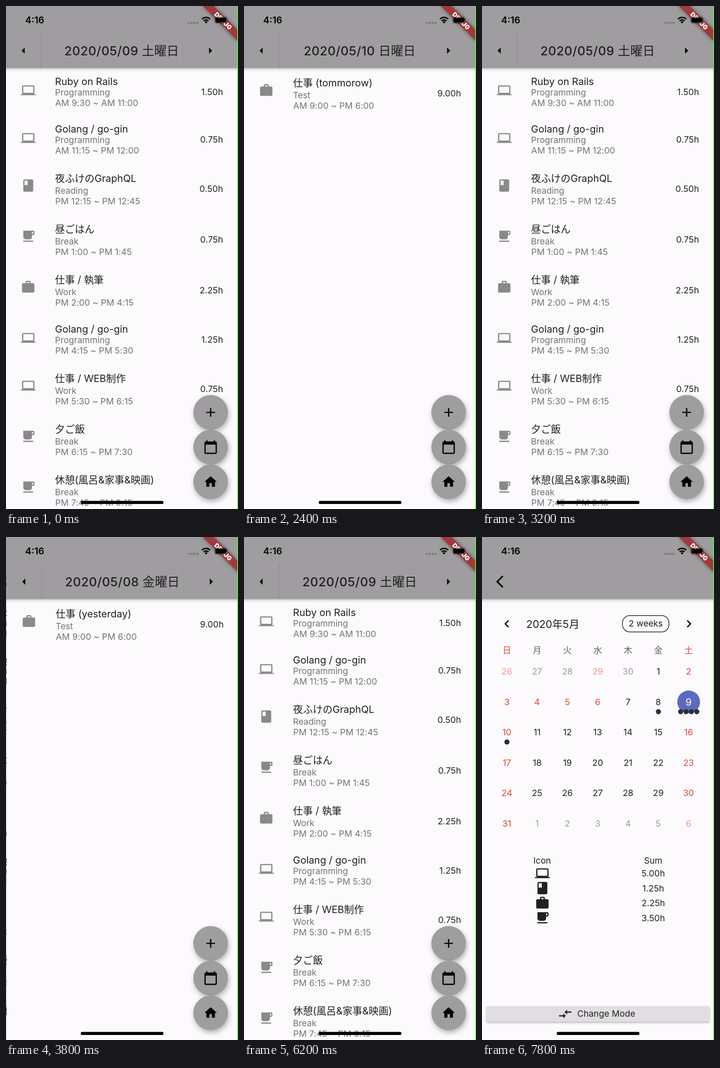
An HTML page that plays this animation: 509 by 1101 pixels, repeating every 8000 ms.

```html
<!DOCTYPE html>
<html lang="ja">
<head>
<meta charset="utf-8">
<title>Time log</title>
<style>
  html, body { margin: 0; width: 100%; height: 100%; overflow: hidden; background: #fcfafc; }
  svg { display: block; width: 100vw; height: 100vh; }
  text { font-family: Inter, "Noto Sans CJK JP", "Noto Sans CJK", sans-serif; font-size: 19px; fill: #222022; white-space: pre; }
  .cjk { font-weight: 300; letter-spacing: 0; }
  .mid { text-anchor: middle; }
  .end { text-anchor: end; }
  .num { letter-spacing: .1px; }
  .date { font-size: 27.1px; font-weight: 500; letter-spacing: .55px; }
  .title { font-size: 21.7px; }
  .sub { fill: #757375; }
  .month { font-size: 23px; }
  .red { fill: #e0443c; }
  .dim { fill: #9d9b9d; }
  .dim.red { fill: #ee9a98; }
  .week { fill: #656365; }
  .picked { fill: #fff; font-size: 21.7px; }
  .clock { font-size: 20.5px; font-weight: 600; fill: #000; }
  .debug { font-size: 13.8px; font-weight: 900; fill: #fff; }
  .fab { fill: #9f9d9f; filter: drop-shadow(2px 5px 6px rgba(0, 0, 0, .3)); }
  .wide { fill: #e0dee0; filter: drop-shadow(0 2px 2px rgba(0, 0, 0, .3)); }
  .band { fill: #a2383b; filter: drop-shadow(0 0 4px rgba(0, 0, 0, .5)); }
</style>
</head>
<body>
<svg viewBox="0 0 509 1101" preserveAspectRatio="none">
  <defs>
    <linearGradient id="edge">
      <stop offset="0" stop-opacity="0"/>
      <stop offset=".3" stop-opacity=".016"/>
      <stop offset=".6" stop-opacity=".07"/>
      <stop offset="1" stop-opacity=".22"/>
    </linearGradient>
    <linearGradient id="fall" x2="0" y2="1">
      <stop offset="0" stop-opacity=".27"/>
      <stop offset=".4" stop-opacity=".1"/>
      <stop offset="1" stop-opacity="0"/>
    </linearGradient>
  </defs>
  <g id="pages"></g>
  <g id="fabs"></g>
  <g id="top"></g>
  <g transform="translate(509 0) rotate(45)">
    <rect class="band" x="-54.3" y="38" width="108.6" height="16.3"/>
    <text class="debug mid" y="51.1">DEBUG</text>
  </g>
  <g id="status">
    <text class="clock" x="42" y="38.3">4:16</text>
    <g fill="#7b797b">
      <circle cx="401.3" cy="37" r="2.4"/><circle cx="407.6" cy="37" r="2.4"/>
      <circle cx="413.8" cy="37" r="2.4"/><circle cx="420" cy="37" r="2.4"/>
    </g>
    <g fill="none" stroke="#000" stroke-width="3">
      <path d="M430 28.8a12.5 12.5 0 0 1 18 0M433.6 32.6a7.7 7.7 0 0 1 10.8 0"/>
    </g>
    <path d="M439 38.3l-3.2-3.3a4.7 4.7 0 0 1 6.4 0z"/>
    <rect x="457.5" y="23.8" width="28" height="14.4" rx="4.4" fill="none" stroke="#000" stroke-opacity=".4" stroke-width="1.2"/>
    <rect x="459.3" y="25.5" width="24.4" height="11" rx="2.8"/>
  </g>
  <rect x="164" y="1083.3" width="181.5" height="6.8" rx="3.4"/>
  <rect x="507.4" width="1.6" height="1101" fill="#4dff3a"/>
</svg>
<script>
const W = 509, H = 1101, LOOP = 8000, STEP = 200, SLIDE = 400, DP = 1.357;

const ICONS = {
  laptop: 'M20 18c1.1 0 2-.9 2-2V6c0-1.1-.9-2-2-2H4c-1.1 0-2 .9-2 2v10c0 1.1.9 2 2 2H0v2h24v-2zM4 6h16v10H4z',
  book: 'M18 2H6c-1.1 0-2 .9-2 2v16c0 1.1.9 2 2 2h12c1.1 0 2-.9 2-2V4c0-1.1-.9-2-2-2zM6 4h5v8l-2.5-1.5L6 12z',
  cup: 'M20 3H4v10c0 2.2 1.8 4 4 4h6c2.2 0 4-1.8 4-4v-3h2c1.1 0 2-.9 2-2V5c0-1.1-.9-2-2-2zm0 5h-2V5h2zM4 19h16v2H4z',
  bag: 'M20 6h-4V4c0-1.1-.9-2-2-2h-4c-1.1 0-2 .9-2 2v2H4c-1.1 0-2 .9-2 2v11c0 1.1.9 2 2 2h16c1.1 0 2-.9 2-2V8c0-1.1-.9-2-2-2zm-6 0h-4V4h4z',
  plus: 'M19 13h-6v6h-2v-6H5v-2h6V5h2v6h6z',
  day: 'M20 3h-1V1h-2v2H7V1H5v2H4c-1.1 0-2 .9-2 2v16c0 1.1.9 2 2 2h16c1.1 0 2-.9 2-2V5c0-1.1-.9-2-2-2zm0 18H4V8h16z',
  home: 'M10 20v-6h4v6h5v-8h3L12 3 2 12h3v8z',
  left: 'M14 7l-5 5 5 5z',
  right: 'M10 17l5-5-5-5z',
  back: 'M11.67 3.87L9.9 2.1 0 12l9.9 9.9 1.77-1.77L3.54 12z',
  prev: 'M15.41 7.41L14 6l-6 6 6 6 1.41-1.41L10.83 12z',
  next: 'M10 6L8.59 7.41 13.17 12l-4.58 4.59L10 18l6-6z',
  swap: 'M9 14H2v2h7v3l4-4-4-4zm6-1v-3h7V8h-7V5l-4 4z'
};

const $ = id => document.getElementById(id);

const icon = (name, cx, cy, fill = '#000') =>
  `<path transform="translate(${cx - 12 * DP} ${cy - 12 * DP}) scale(${DP})" fill="${fill}" fill-rule="evenodd" d="${ICONS[name]}"/>`;

const label = (cls, x, y, s) => {
  const body = String(s).replace(/&/g, '&amp;').replace(/[\u3000-\u9fff]+/g, '<tspan class="cjk">$&</tspan>');
  return `<text class="${cls}" x="${x}" y="${y}">${body}</text>`;
};

const dot = (x, y) => `<circle cx="${x}" cy="${y}" r="5.6" fill="#2b2f36"/>`;

// Rows with Japanese titles are taller, so their text sits lower.
function row([kind, y, title, sub, time, hours]) {
  const drop = /[\u3000-\u9fff]/.test(title) ? 6.5 : 0;
  const lift = drop ? 3.5 : 0;
  return icon(kind, 48.8, y, '#8a888a') +
    label('title', 107.5, y - 12 + lift, title) +
    label('sub', 107.5, y + 11.3 + drop, sub) +
    label('sub num', 108, y + 34.3 + drop, time) +
    label('num end', 476.3, y + 10 + drop * .6, hours);
}

const frame = body =>
  `<rect class="edge" x="-25.5" width="25.5" height="${H}" fill="url(#edge)"/>` +
  `<rect width="${W}" height="${H}" fill="#fcfafc"/>${body}` +
  `<rect y="135" width="${W}" height="9" fill="url(#fall)"/>` +
  `<rect width="${W}" height="135.7" fill="#9f9d9f"/>`;

const dayPage = (date, rows) => frame(rows.map(row).join('')) +
  '<rect x="76" y="60" width="1.5" height="75" fill="#918f91"/>' +
  '<rect x="388" y="60" width="1.2" height="75" fill="#979597"/>' +
  icon('left', 38.2, 97.8) + icon('right', 448.3, 97.8) +
  label('date mid', 253.7, 108.2, date);

function calendar() {
  let s = icon('prev', 54.5, 190) + icon('next', 454, 190) +
    label('month', 97, 198.5, '2020年5月') +
    '<rect x="308.2" y="172" width="102" height="35.8" rx="16" fill="none" stroke="#222022" stroke-width="1.5"/>' +
    label('mid', 359.2, 196.3, '2 weeks');
  const colX = c => 54.5 + 66.45 * c;
  [...'日月火水木金土'].forEach((d, c) =>
    s += label('mid ' + (c % 6 ? 'week' : 'red'), colX(c), 255, d));
  s += '<circle cx="453.4" cy="361" r="25" fill="#5c6bc0"/>';
  const holidays = [-1, 4, 5, 6];
  for (let i = 0; i < 42; i++) {
    const n = i - 4, c = i % 7, y = 301.3 + 66.45 * Math.floor(i / 7);
    const day = n < 1 ? n + 30 : n > 31 ? n - 31 : n;
    let cls = 'mid';
    if (n < 1 || n > 31) cls += ' dim';
    if (c % 6 === 0 || holidays.includes(n)) cls += ' red';
    if (n === 9) cls = 'mid picked';
    s += label(cls, colX(c), n === 9 ? y + 1 : y, day);
  }
  s += dot(387, 382.3) + dot(54.7, 448.7);
  for (let i = 0; i < 4; i++) s += dot(435.8 + 11.8 * i, 382.3);

  s += label('mid', 132, 714.8, 'Icon') + label('mid', 375.6, 714.8, 'Sum');
  [['laptop', '5.00h'], ['book', '1.25h'], ['bag', '2.25h'], ['cup', '3.50h']].forEach(([kind, sum], i) => {
    const y = 736 + 32.5 * i;
    s += icon(kind, 132.5, y, '#222022') + label('mid num', 375.8, y + 7, sum);
  });
  s += '<rect class="wide" x="10" y="1027" width="489" height="34" rx="3"/>' +
    icon('swap', 182.5, 1044, '#222022') + label('num', 209, 1050.3, 'Change Mode');
  return frame(s) + icon('back', 47.3, 97.8);
}

const nine = '9.00h', shift = 'AM 9:00 ~ PM 6:00';
const markup = {
  sat: dayPage('2020/05/09 土曜日', [
    ['laptop', 184.5, 'Ruby on Rails', 'Programming', 'AM 9:30 ~ AM 11:00', '1.50h'],
    ['laptop', 289, 'Golang / go-gin', 'Programming', 'AM 11:15 ~ PM 12:00', '0.75h'],
    ['book', 393, '夜ふけのGraphQL', 'Reading', 'PM 12:15 ~ PM 12:45', '0.50h'],
    ['cup', 504, '昼ごはん', 'Break', 'PM 1:00 ~ PM 1:45', '0.75h'],
    ['bag', 615, '仕事 / 執筆', 'Work', 'PM 2:00 ~ PM 4:15', '2.25h'],
    ['laptop', 726.5, 'Golang / go-gin', 'Programming', 'PM 4:15 ~ PM 5:30', '1.25h'],
    ['laptop', 831, '仕事 / WEB制作', 'Work', 'PM 5:30 ~ PM 6:15', '0.75h'],
    ['cup', 942, '夕ご飯', 'Break', 'PM 6:15 ~ PM 7:30', '1.25h'],
    ['cup', 1053, '休憩(風呂&家事&映画)', 'Break', 'PM 7:45 ~ PM 9:15', '1.50h']
  ]),
  sun: dayPage('2020/05/10 日曜日', [['bag', 184.5, '仕事 (tommorow)', 'Test', shift, nine]]),
  fri: dayPage('2020/05/08 金曜日', [['bag', 184.5, '仕事 (yesterday)', 'Test', shift, nine]]),
  cal: calendar()
};

const pages = {};
for (const name in markup) {
  const g = document.createElementNS('http://www.w3.org/2000/svg', 'g');
  g.innerHTML = markup[name];
  pages[name] = g;
}

$('fabs').innerHTML = ['plus', 'day', 'home'].map((name, i) => {
  const y = 889.5 + 76 * i;
  return `<circle class="fab" cx="449" cy="${y}" r="38"/>` + icon(name, 449, y);
}).join('');

// Start time, page below, page sliding in
const moves = [
  [0, 'sat', 'sat'],
  [1533, 'sat', 'sun'],
  [2555, 'sun', 'sat'],
  [3424, 'sat', 'fri'],
  [5311, 'fri', 'sat'],
  [6210, 'sat', 'cal']
];

// cubic-bezier(.35, .91, .33, .97), solved by bisection
function ease(x) {
  if (x >= 1) return 1;
  const curve = (s, a, b) => 3 * (1 - s) * s * ((1 - s) * a + s * b) + s ** 3;
  let lo = 0, hi = 1;
  for (let i = 0; i < 24; i++) {
    const m = (lo + hi) / 2;
    if (curve(m, .35, .33) < x) lo = m; else hi = m;
  }
  return curve(lo, .91, .97);
}

const slide = (el, x) => el.setAttribute('transform', `translate(${x.toFixed(2)} 0)`);

function draw(t) {
  const [at, from, to] = moves.filter(m => m[0] <= t).pop();
  const p = from === to ? 1 : ease((t - at) / SLIDE);
  const over = pages[to], under = pages[from];
  slide(under, -W / 3 * p);
  under.querySelector('.edge').setAttribute('opacity', 0);
  slide(over, W * (1 - p));
  over.querySelector('.edge').setAttribute('opacity', p);

  // The round buttons stay put between days; the calendar slides over them.
  const toCal = to === 'cal';
  slide($('fabs'), toCal ? -W / 3 * p : 0);
  $('pages').replaceChildren(under);
  $(toCal ? 'top' : 'pages').append(over);
  if (!toCal) $('top').replaceChildren();
}

const start = performance.now();
let last = -1;
function tick() {
  const t = Math.floor((performance.now() - start + 10) / STEP) * STEP % LOOP;
  if (t !== last) draw(last = t);
  requestAnimationFrame(tick);
}
tick();
</script>
</body>
</html>
```
